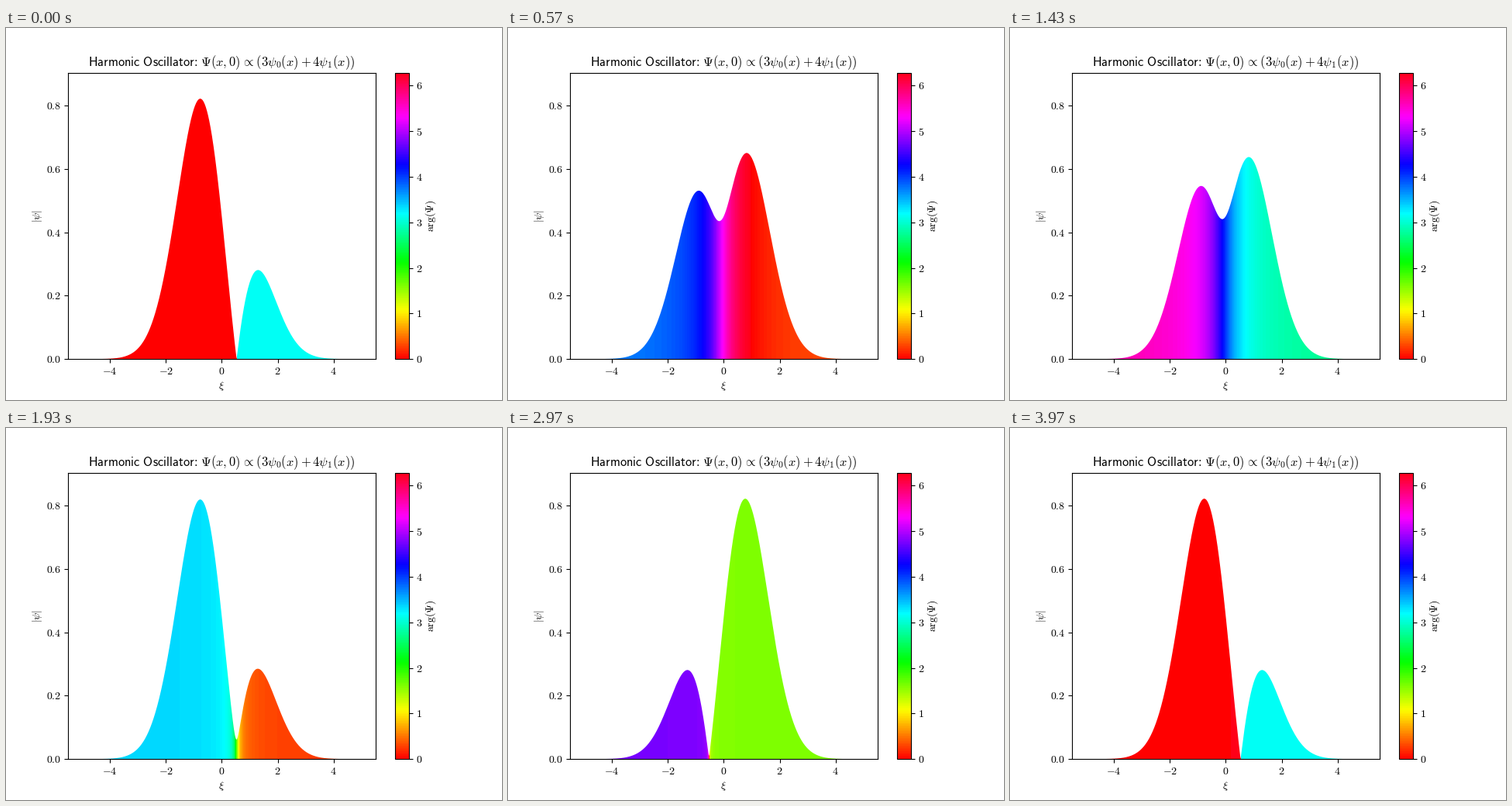
Recreate the animation shown at these times as a matplotlib script. Size 640 by 480 pixels, loop 4010 ms.

```python
import numpy as np
import matplotlib.pyplot as plt
from matplotlib.animation import FuncAnimation
from matplotlib.cm import ScalarMappable
from matplotlib.colors import Normalize
from matplotlib.path import Path

plt.rcParams.update({
    "mathtext.fontset": "cm",
    "font.family": "Liberation Serif",
    "ytick.major.pad": 2.6,
})

STEPS = 120
TICK_MS = 10
TICKS = 401
X_MAX = 5.5
TAU = 2 * np.pi

xi = np.linspace(-X_MAX, X_MAX, 1101)
psi0 = np.pi ** -0.25 * np.exp(-xi ** 2 / 2)
psi1 = np.sqrt(2) * xi * psi0
theta = np.linspace(0, 2 * TAU, STEPS)


def wave(t):
    """Superposition of the two lowest states, energies 1/2 and 3/2."""
    return (3 * psi0 * np.exp(-0.5j * t) - 4 * psi1 * np.exp(-1.5j * t)) / 5


def phase_colors(psi):
    return plt.cm.hsv(np.mod(np.angle(psi), TAU) / TAU, bytes=True)[np.newaxis]


def area(height):
    """Closed outline between the curve and the axis."""
    top = np.column_stack([xi, height])
    return Path(np.vstack([[-X_MAX, 0], top, [X_MAX, 0], [-X_MAX, 0]]))


fig, ax = plt.subplots(figsize=(6.4, 4.8), dpi=100)
y_max = 1.1 * np.abs(wave(0)).max()
fill = ax.imshow(phase_colors(wave(0)), extent=(-X_MAX, X_MAX, 0, y_max),
                 aspect="auto", interpolation="nearest")
ax.set(xlim=(-X_MAX, X_MAX), ylim=(0, y_max))
ax.set_xlabel(r"$\xi$", labelpad=3)
ax.set_ylabel(r"$|\psi|$", labelpad=2)
# The extra spaces even out mathtext's padding around relations.
ax.set_title(r"$\mathsf{Harmonic\ Oscillator\hspace{-0.2}:\hspace{0.13}}"
             r"\Psi(x,0)\hspace{0.08}\propto\hspace{0.08}"
             r"(3\psi_0(x)+4\psi_1(x))$", fontsize=11.85)
ax.set_xticks(range(-4, 5, 2))
ax.set_yticks(np.arange(0, 0.9, 0.2))
ax.xaxis.set_major_formatter(lambda v, _: f"${v:.0f}$")
ax.yaxis.set_major_formatter(lambda v, _: f"${v:.1f}$")

bar = fig.colorbar(ScalarMappable(Normalize(0, TAU), "hsv"), ax=ax)
bar.set_ticks(range(7))
bar.ax.yaxis.set_major_formatter(lambda v, _: f"${v:.0f}$")
bar.set_label(r"$\mathrm{arg}(\Psi)$", labelpad=1.5)


def update(tick):
    # 30 steps a second, each starting on the nearest 10 ms tick.
    step = min((6 * tick + 3) // 20, STEPS - 1)
    psi = wave(theta[step])
    fill.set_data(phase_colors(psi))
    fill.set_clip_path(area(np.abs(psi)), ax.transData)
    return [fill]


anim = FuncAnimation(fig, update, frames=TICKS, interval=TICK_MS,
                     repeat=True, repeat_delay=0)
plt.show()
```
